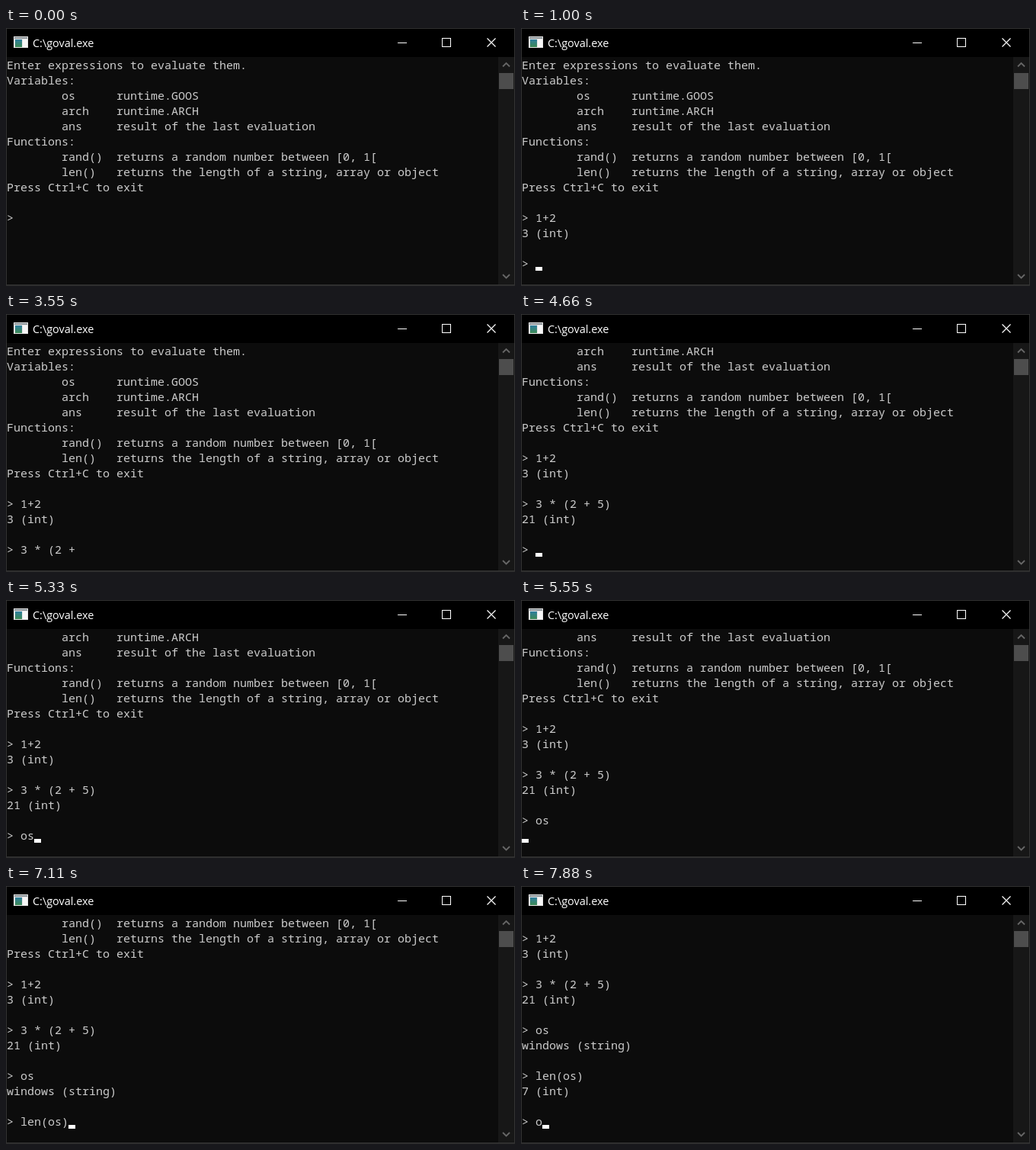
Recreate the animation shown at these times as an HTML page. Size 668 px wide and 338 px high, loop 8 s.

```html
<!DOCTYPE html>
<html lang="en">
<head>
<meta charset="utf-8">
<title>Expression console</title>
<style>
  html, body { margin: 0; width: 100%; height: 100%; overflow: hidden; background: #0c0c0c; }
  svg { display: block; width: 668px; height: 338px; }
  #screen text { font: 15px "Noto Sans Mono", "DejaVu Sans Mono", monospace; fill: #ccc; white-space: pre; }
  .title { font: 14.4px "Open Sans", "Noto Sans", sans-serif; fill: #fff; }
</style>
</head>
<body>
<svg viewBox="0 0 668 338">
  <defs>
    <linearGradient id="pane" x2="0" y2="1">
      <stop offset="0" stop-color="#2f7fa0"/>
      <stop offset="1" stop-color="#3d8a55"/>
    </linearGradient>
  </defs>
  <rect width="668" height="338" fill="#0c0c0c"/>
  <rect width="668" height="38" fill="#000"/>

  <g shape-rendering="crispEdges">
    <rect x="10" y="11" width="19" height="15" fill="#e6e6e6"/>
    <rect x="11" y="12" width="17" height="2" fill="#8c9499"/>
    <rect x="12" y="15" width="9" height="10" fill="url(#pane)"/>
    <rect x="22" y="15" width="6" height="10" fill="#f7f7f7"/>
  </g>
  <text class="title" x="35" y="25">C:\goval.exe</text>

  <g fill="none" stroke="#fff">
    <path d="M514 19.5H526"/>
    <rect x="572.5" y="13.5" width="11" height="11"/>
    <path d="M631.5 13.5l11 11m0-11l-11 11" stroke-width="1.2"/>
  </g>

  <rect x="646" y="38" width="21" height="298" fill="#171717"/>
  <rect x="647" y="59" width="19" height="21" fill="#4d4d4d"/>
  <g fill="none" stroke="#676767" stroke-width="1.8">
    <path d="M652 50.5l4.500-4.500 4.500 4.500"/>
    <path d="M652 323l4.500 4.500 4.500-4.500"/>
  </g>

  <g id="screen"></g>
  <rect id="cursor" width="9" height="5" fill="#fff" shape-rendering="crispEdges"/>

  <rect x=".5" y=".5" width="667" height="336" fill="none" stroke="#333"/>
  <rect y="337" width="668" height="1" fill="#2b2b2b"/>
</svg>
<script>
const LOOP = 8000, ROWS = 14, CELL_W = 9, CELL_H = 20, LEFT = 1, TOP = 38;

const intro = `Enter expressions to evaluate them.
Variables:
        os      runtime.GOOS
        arch    runtime.ARCH
        ans     result of the last evaluation
Functions:
        rand()  returns a random number between [0, 1[
        len()   returns the length of a string, array or object
Press Ctrl+C to exit

> `;

// Time in ms and the text appended to the console at that moment.
const output = [
  [660, "1"], [770, "+"], [880, "2"], [1000, "\n3 (int)\n\n> "],
  [1660, "3"], [1770, " "], [2110, "*"], [2220, " "],
  [2440, "("], [2550, "2"], [2660, " "], [2770, "+"], [3000, " "],
  [3880, "5"], [4000, ")"], [4550, "\n"], [4660, "21 (int)\n\n> "],
  [5220, "o"], [5330, "s"], [5550, "\n"], [5660, "windows (string)\n\n> "],
  [6000, "l"], [6110, "e"], [6220, "n"],
  [6440, "("], [6660, "o"], [6770, "s"], [7000, ")"],
  [7330, "\n"], [7440, "7 (int)\n\n> "], [7880, "o"]
];
const cursorOff = [[0, 660], [1440, 1660], [3550, 3880]];

const screen = document.getElementById("screen");
const cursor = document.getElementById("cursor");
const rows = Array.from({ length: ROWS }, (_, i) => {
  const row = document.createElementNS("http://www.w3.org/2000/svg", "text");
  row.setAttribute("x", LEFT);
  row.setAttribute("y", TOP + 16 + i * CELL_H);
  return screen.appendChild(row);
});

function render(t) {
  const typed = output.filter(([at]) => at <= t).map(([, text]) => text).join("");
  const lines = (intro + typed).split("\n").slice(-ROWS);
  rows.forEach((row, i) => {
    const text = lines[i] || "";
    if (row.textContent !== text) row.textContent = text;
  });
  const last = lines.length - 1;
  cursor.setAttribute("x", LEFT + lines[last].length * CELL_W);
  cursor.setAttribute("y", TOP + (last + 1) * CELL_H - 5);
  const hidden = cursorOff.some(([from, to]) => t >= from && t < to);
  cursor.setAttribute("visibility", hidden ? "hidden" : "visible");
}

const start = performance.now();
function tick() {
  render((performance.now() - start) % LOOP);
  requestAnimationFrame(tick);
}
tick();
</script>
</body>
</html>
```
